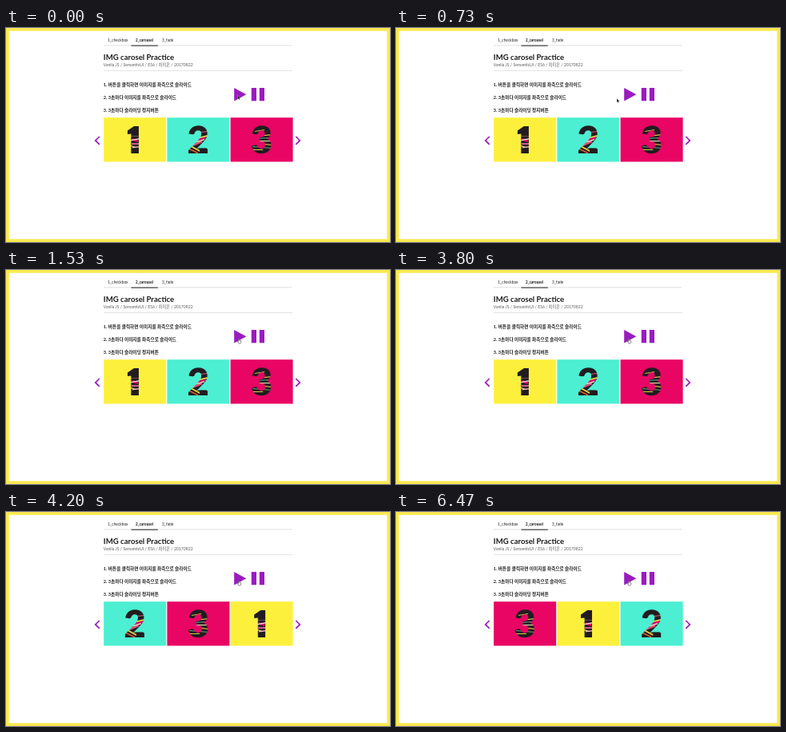
An HTML page with a canvas for the animation above (8 s loop, 480x268 px).

```html
<!DOCTYPE html>
<html lang="ko">
<head>
<meta charset="utf-8">
<title>Carousel practice</title>
<style>
  html, body { margin: 0; width: 100%; height: 100%; overflow: hidden; background: #fff; }
  canvas { display: block; width: 480px; height: 268px; }
</style>
</head>
<body>
<canvas id="stage"></canvas>
<script>
const W = 480, H = 268, LOOP = 8000, BORDER = 3.7;
const PURPLE = '#9a1bbf', INK = '#211c20';
const PINK = '#e80564', YELLOW = '#fdf03c', TEAL = '#4cefd1';
const FONT = 'Lato, "Noto Sans CJK KR", sans-serif';

const canvas = document.getElementById('stage');
const ratio = window.devicePixelRatio || 1;
canvas.width = W * ratio;
canvas.height = H * ratio;
const ctx = canvas.getContext('2d');

function polygon(c, points, color) {
  c.beginPath();
  points.forEach(([x, y]) => c.lineTo(x, y));
  c.closePath();
  c.fillStyle = color;
  c.fill();
}

function rect(x, y, w, h, color) {
  ctx.fillStyle = color;
  ctx.fillRect(x, y, w, h);
}

function text(str, x, y, size, weight = 400, color = '#202020') {
  ctx.font = `${weight} ${size}px ${FONT}`;
  ctx.fillStyle = color;
  ctx.fillText(str, x, y);
}

// Stripe: left height, right height, thickness, colour, left edge, right edge
const cards = [
  { digit: '1', color: YELLOW, stripes: [
    [15, 15, 1, '#6b4d5b', 15, 25],
    [18, 20, 3, PINK, 17, 24], [20, 18, 1.4, '#f4dce8', 15, 26],
    [24, 24, 2.2, '#c95a96', 16, 25], [27, 29, 1.2, '#e9d94a', 15, 22],
    [29, 28, 1.4, '#f0bdd3', 17, 26]] },
  { digit: '2', color: TEAL, stripes: [
    [10, 9, 1, '#d8577f', 23, 32],
    [18, 14, 1.6, '#f3e64a', 16, 32], [21, 16, 2.4, PINK, 14, 30],
    [24, 19, 1.4, '#f7e9d8', 12, 28], [28, 21, 2.4, '#e9527c', 8, 25],
    [26, 33, 2, '#f2d33f', 9, 22], [30, 36, 1.6, '#e8672e', 8, 20]] },
  { digit: '3', color: PINK, stripes: [
    [9, 7, 1, '#cfbf48', 12, 24],
    [15, 13, 1.2, '#d9cb44', 14, 33], [18, 17, 1, '#4fa98d', 13, 32],
    [21, 21, 1.1, '#e5dfae', 14, 33], [24, 26, 1.2, '#d2c33d', 17, 33],
    [28, 30, 1, '#55a47e', 9, 33], [32, 32, 1, '#d9cb44', 8, 22]] }
];

const ONE = [[11, 8.5], [19, 3], [25, 3], [25, 37], [15.5, 37], [15.5, 12.5], [11, 13]];

function drawDigit(c, digit) {
  if (digit === '1') return polygon(c, ONE, INK);
  c.font = '900 47px Lato, sans-serif';
  const m = c.measureText(digit);
  const x = 20 - (m.actualBoundingBoxRight - m.actualBoundingBoxLeft) / 2;
  c.fillStyle = INK;
  c.fillText(digit, x, 37);
}

function makeDigit({ digit, stripes }) {
  const scale = 4, art = document.createElement('canvas');
  art.width = art.height = 40 * scale;
  const c = art.getContext('2d');
  c.scale(scale, scale);
  drawDigit(c, digit);
  c.globalCompositeOperation = 'source-atop';
  for (const [a, b, thick, color, left, right] of stripes) {
    polygon(c, [[left, a], [right, b], [right, b + thick], [left, a + thick]], color);
  }
  return art;
}
cards.forEach(card => { card.art = makeDigit(card); });

function drawCards(first) {
  ctx.imageSmoothingQuality = 'high';
  for (let i = 0; i < 3; i++) {
    const card = cards[(first + i) % 3], x = 122.2 + i * 79.2;
    rect(x, 112.2, 78, 55.3, card.color);
    ctx.drawImage(card.art, x + 18.7, 120, 40, 40);
  }
}

function chevron(x, dir) {
  ctx.beginPath();
  ctx.moveTo(x - 2.5 * dir, 136);
  ctx.lineTo(x + 2.5 * dir, 140.9);
  ctx.lineTo(x - 2.5 * dir, 145.8);
  ctx.strokeStyle = PURPLE;
  ctx.lineWidth = 1.7;
  ctx.stroke();
}

function drawPage() {
  rect(0, 0, W, H, '#f9e94f');
  rect(BORDER, BORDER, W - 2 * BORDER, H - 2 * BORDER, '#fff');

  text('1_checkbox', 127.3, 17.2, 4.85);
  text('2_carousel', 162, 17.2, 4.6, 700, '#111');
  text('3_fade', 195, 17.2, 4.85);
  rect(122, 21.6, 235, 0.6, '#c9c9c9');
  rect(156.5, 21.6, 33.3, 1, '#222');

  text('IMG carosel Practice', 121.8, 40, 9.6, 700, '#1c1c1c');
  text('Vanila JS / SemanticUI / ES6 / 차미온 / 20170822', 121.8, 47.6, 5.13, 400, '#5c5c5c');
  rect(122, 53, 236, 0.7, '#d8d8d8');

  text('1. 버튼을 클릭하면 이미지를 좌측으로 슬라이드', 121.8, 73, 5.65, 700);
  text('2. 3초마다 이미지를 좌측으로 슬라이드', 121.8, 89.2, 5.65, 700);
  text('3. 3초마다 슬라이딩 정지버튼', 121.8, 105.4, 5.65, 700);

  polygon(ctx, [[285.2, 75], [300.3, 83.2], [285.2, 91.4]], PURPLE);
  rect(306.8, 75, 6.2, 16.3, PURPLE);
  rect(316.8, 75, 6.2, 16.3, PURPLE);
  chevron(114.3, -1);
  chevron(364.8, 1);
}

// Pointer path: time, x, y
const path = [
  [70, 289.5, 84.5], [330, 275, 88.8], [470, 275, 88.8],
  [730, 276, 88.2], [1130, 290.6, 86]
];

function pointerAt(t) {
  const next = path.findIndex(p => p[0] > t);
  if (next === 0) return path[0].slice(1);
  if (next < 0) return path[path.length - 1].slice(1);
  const [t0, x0, y0] = path[next - 1], [t1, x1, y1] = path[next];
  const k = (t - t0) / (t1 - t0), e = k * k * (3 - 2 * k);
  return [x0 + (x1 - x0) * e, y0 + (y1 - y0) * e];
}

function drawPointer(t) {
  const [x, y] = pointerAt(t), hand = t >= 1130;
  const shape = hand
    ? [[0, 0], [1, 0], [1.2, 2.2], [3.3, 2.8], [3.2, 4.6], [2.4, 6], [0.2, 6], [-1.4, 3.6], [-0.8, 3.2], [0, 3.8]]
    : [[0, 0], [0, 5], [1.2, 4], [2, 5.7], [2.8, 5.3], [2, 3.7], [3.5, 3.6]];
  ctx.save();
  ctx.translate(x, y);
  polygon(ctx, shape, hand ? '#fff' : '#111');
  ctx.strokeStyle = hand ? '#333' : '#fff';
  ctx.lineWidth = hand ? 0.55 : 0.3;
  ctx.stroke();
  ctx.restore();
}

function frame(now) {
  const t = now % LOOP;
  ctx.setTransform(ratio, 0, 0, ratio, 0, 0);
  drawPage();
  drawCards(t < 3930 ? 0 : t < 6470 ? 1 : 2);
  drawPointer(t);
}

const start = performance.now();
function tick() {
  frame(performance.now() - start);
  requestAnimationFrame(tick);
}
tick();
</script>
</body>
</html>
```
